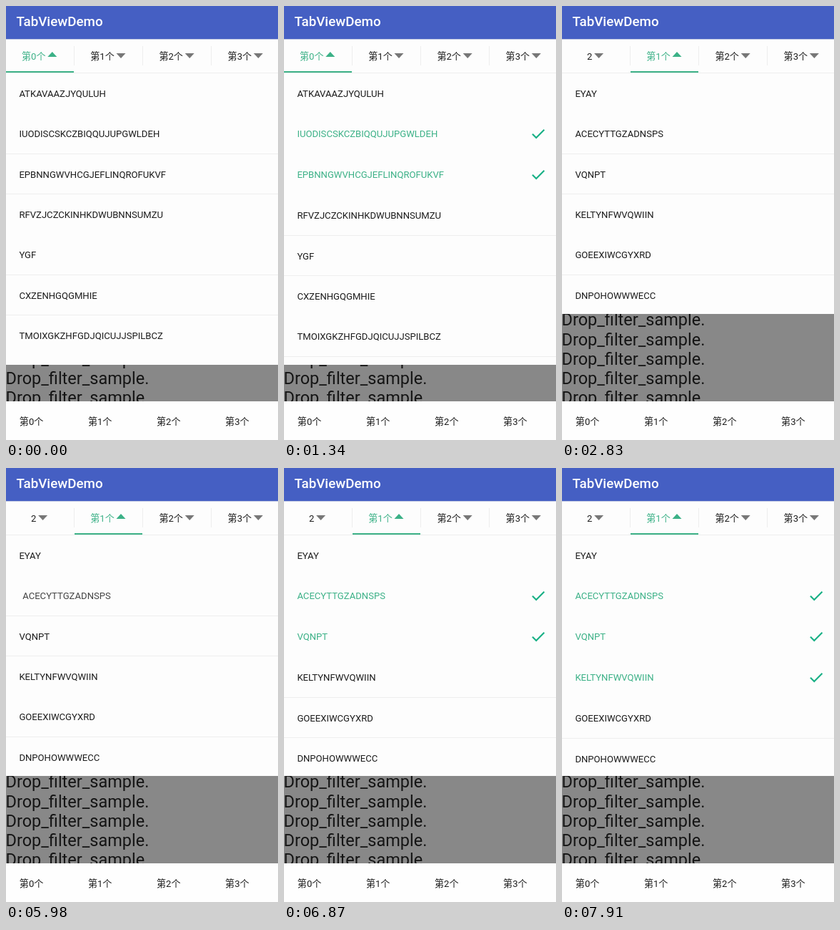
These frames come from a looping animation (381x606 px, 8 s). An HTML page:

```html
<!DOCTYPE html>
<html lang="zh">
<head>
<meta charset="utf-8">
<style>
html, body { margin: 0; width: 100%; height: 100%; overflow: hidden; }
svg { display: block; width: 381px; height: 606px; font-family: Roboto, "Noto Sans CJK SC", "Noto Sans CJK", sans-serif; }
</style>
</head>
<body>
<svg id="stage" viewBox="0 0 381 606"></svg>
<script>
const LOOP = 8000, SWITCH = 2540, TOP = 93.3, PITCH = 56.35;
const GREEN = "#3cb187", INK = "#1c1c1c", LINE = "#eeeeee", PAPER = "#fdfdfd";

// picks: row, press time, selected time, settled time
const lists = [
  {
    bottom: 501,
    rows: ["ATKAVAAZJYQULUH", "IUODISCSKCZBIQQUJUPGWLDEH", "EPBNNGWVHCGJEFLINQROFUKVF",
      "RFVZJCZCKINHKDWUBNNSUMZU", "YGF", "CXZENHGQGMHIE", "TMOIXGKZHFGDJQICUJJSPILBCZ"],
    picks: [[1, 300, 440, 440], [2, 1190, 1340, 1340]]
  },
  {
    bottom: 430,
    rows: ["EYAY", "ACECYTTGZADNSPS", "VQNPT", "KELTYNFWVQWIIN", "GOEEXIWCGYXRD", "DNPOHOWWWECC"],
    picks: [[1, 5980, 6130, 6280], [2, 6730, 6870, 6870], [3, 7620, 7760, 7910]]
  }
];

const rect = (x, y, w, h, fill) => `<rect x="${x}" y="${y}" width="${w}" height="${h}" fill="${fill}"/>`;
const text = (x, y, s, fill = INK, size = 13.1, extra = "") =>
  `<text x="${x}" y="${y}" font-size="${size}" fill="${fill}" ${extra}>${s}</text>`;
const arrow = (x, turn, fill) =>
  `<path d="M-6.5-2.5H6.5L0 4.5Z" fill="${fill}" transform="translate(${x} 68.5) rotate(${turn})"/>`;
const check = (y, alpha) =>
  `<path d="M348 ${y + 29}l5.3 5.4l11.2-11.2" fill="none" stroke="#18b085" stroke-width="2.1" opacity="${alpha}"/>`;

function drawTabs(t) {
  const active = t < SWITCH ? 0 : 1;
  const step = t < SWITCH || t >= 2830 ? 1 : t < 2680 ? 0.33 : 0.7;
  let out = rect(0, 47, 381, 46, PAPER) + rect(0, 93, 381, 1, LINE);
  for (let i = 0; i < 4; i++) {
    const on = i === active, counted = i === 0 && active === 1;
    const x = 22 + i * 96.2;
    const turn = on ? 180 * step : counted ? 180 + 180 * step : 0;
    out += counted ? text(35, 74.7, "2") : text(x, 74.7, `第${i}个`, on ? GREEN : INK);
    out += arrow(counted ? 51.6 : x + 42.8, turn, on ? GREEN : "#777");
    if (i) out += rect(i * 96 - 1, 56, 1, 27, LINE);
  }
  return out + rect(active * 96, 91, 95, 2, GREEN);
}

function drawList(list, t) {
  let y = TOP, out = rect(0, 94, 381, list.bottom - 94, PAPER);
  list.rows.forEach((label, i) => {
    const [, press, done, settled] = list.picks.find(p => p[0] === i) || [0, LOOP, LOOP, LOOP];
    const chosen = t >= done, held = t >= press && !chosen;
    const alpha = chosen && t < settled ? 0.8 : 1;
    out += text(held ? 23.2 : 18.4, (y + 33.6).toFixed(2), label,
      chosen ? GREEN : held ? "#444" : INK, 13.1, `opacity="${alpha}"`);
    if (chosen) out += check(y, alpha);
    y += chosen ? 57 : PITCH;
    // hairlines only survive on some pixel rows
    if (y % 1 < 0.6 && y < list.bottom - 2) out += rect(0, Math.floor(y), 381, 1, LINE);
  });
  return out;
}

function draw(t) {
  const list = lists[t < SWITCH ? 0 : 1];
  let out = rect(0, 0, 381, 606, "#888");
  for (let i = 0; i < 5; i++)
    out += text(-0.5, 446.4 + i * 27.2, "Drop_filter_sample.", "#151515", 23.5);
  out += `<svg width="381" height="${list.bottom}">${drawList(list, t)}</svg>`;
  // descenders just below the taller list
  out += drawTabs(t) + rect(0, 0, 381, 46, "#455fc3") + rect(0, 46, 381, 1, "#c3c9e3");
  out += text(14.6, 28, "TabViewDemo", "#fff", 18.8, 'font-weight="500"');
  out += rect(0, 552, 381, 54, "#fefefe");
  for (let i = 0; i < 4; i++) out += text(18.8 + i * 96.1, 584.7, `第${i}个`);
  return out;
}

const stage = document.getElementById("stage");
let last = "";
function tick() {
  const markup = draw(performance.now() % LOOP);
  if (markup !== last) stage.innerHTML = last = markup;
  requestAnimationFrame(tick);
}
tick();
</script>
</body>
</html>
```
